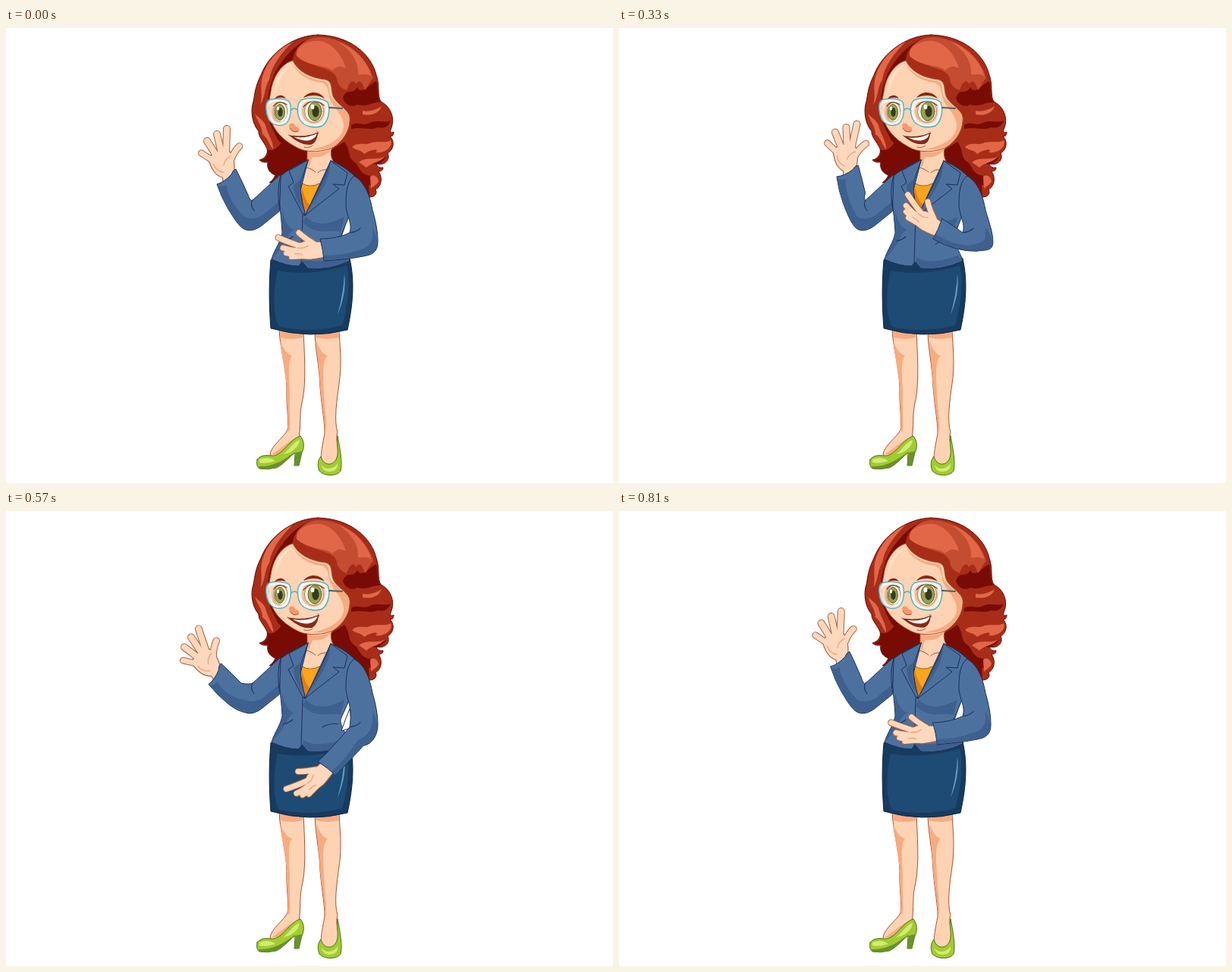
Recreate the animation shown at these times as an HTML page. Size 800x600 px, loop 1290 ms.

```html
<!DOCTYPE html>
<html lang="en">
<head>
<meta charset="utf-8">
<title>Waving woman</title>
<style>
html, body { margin: 0; width: 100%; height: 100%; overflow: hidden; background: #fff; }
svg { display: block; width: 100vw; height: 100vh; }
path, ellipse { stroke-linecap: round; stroke-linejoin: round; }
.hair { fill: #a82d18; stroke: #5d0d05; stroke-width: 1; }
.dark { fill: #780c04; }
.glow { fill: #e16748; }
.warm { fill: #c44c30; }
.skin { fill: #fdd3b4; stroke: #a65432; stroke-width: 1; }
.tan { fill: #f6ab80; }
.coat { fill: #4d719f; stroke: #1a3056; stroke-width: 1; }
.fold { fill: #3e608f; }
.seam { fill: none; stroke: #1e3661; stroke-width: 1.1; }
.line { fill: none; stroke: #a65432; stroke-width: 1; }
.shoe { fill: #a2cb31; stroke: #4d701b; stroke-width: 1; }
.glass { fill: #fff; fill-opacity: .1; stroke: #f4faf8; stroke-width: 4; stroke-opacity: .85; }
.rim { fill: none; stroke: #4fb3bb; stroke-width: 1.4; }
.edge { fill: none; stroke: #a9603c; }
.flesh { fill: none; stroke: #fdd8bd; }
</style>
</head>
<body>
<svg viewBox="0 0 800 600" preserveAspectRatio="none">
  <!-- hair -->
  <path class="hair" d="M411 9C378 10 347 33 336 62C328 78 328 87 326 97C322 108 324 126 333 136C332 143 340 150 344 159C346 167 340 173 334 174C338 178 342 177 345 177C343 186 349 192 355 194C353 199 350 202 347 204C360 202 370 194 382 190L450 200L479 223C486 223 490 218 487 213C496 208 496 196 491 189C495 189 497 187 497 184C491 185 489 182 488 179C500 182 507 173 503 165C512 160 512 148 506 143C510 143 511 141 511 137C508 139 506 138 507 134C514 118 506 103 494 97C489 90 493 75 488 62C482 36 455 10 411 9Z"/>
  <path class="dark" d="M344 160C352 164 358 158 364 150L400 162L430 160L446 150C454 160 450 170 458 176C466 180 464 190 476 194C490 196 484 208 478 207L479 222L450 195L385 190C370 194 360 202 348 203C354 199 354 196 356 194C348 192 343 186 346 177L335 175C344 172 346 167 344 160Z"/>
  <path class="dark" d="M444 92C450 77 456 90 463 78C469 89 477 75 488 70C491 80 488 91 494 98C483 97 476 105 463 101C454 106 446 100 444 92ZM455 128C464 122 470 130 480 125C489 120 498 126 507 122C504 130 498 133 490 131C480 136 469 130 455 133ZM470 181C480 173 488 177 501 170C495 180 487 181 481 178Z"/>
  <path class="warm" d="M411 12C446 12 475 36 484 66C479 70 477 78 473 82C470 73 467 66 461 74C458 66 452 72 449 82C442 80 436 74 436 66C430 50 404 55 384 36C380 24 394 14 411 12Z"/>
  <path class="glow" d="M383 37C381 24 397 16 414 17C431 20 443 36 448 53C439 48 434 52 430 56C420 47 399 52 383 37ZM438 18C463 28 477 47 482 64C474 58 469 63 464 61C465 43 455 30 438 18Z"/>
  <path class="glow" d="M456 157C464 149 473 156 482 151C492 149 501 152 507 148C511 158 497 166 487 164C494 158 480 160 472 166C467 160 462 162 456 157ZM465 177C476 169 485 175 499 170C492 178 482 177 475 184ZM470 109C478 111 488 108 495 103C492 113 481 116 470 114ZM480 196C486 192 490 197 491 202C488 208 484 208 481 212Z"/>
  <path class="glow" d="M378 18C358 28 344 44 338 64C334 80 339 88 335 101C342 92 340 79 347 68C350 50 362 34 378 18ZM328 113C331 123 338 130 338 140C346 146 346 153 352 160C353 150 344 139 342 128C338 120 332 118 328 113Z"/>
  <path class="dark" d="M402 13C381 21 365 39 354 60C347 77 344 92 345 106C343 120 352 134 358 147C366 157 372 158 380 158L350 126C344 107 347 71 378 43C378 30 389 19 402 13Z"/>

  <!-- legs and shoes -->
  <path class="skin" d="M360 397C361 422 369 445 370 474C369 496 373 515 371 530C366 540 350 550 348 562C352 573 369 560 386 541C389 525 386 509 391 490C396 465 393 425 392 399Z"/>
  <path class="tan" d="M361 400H391V408Q375 412 362 408ZM361 412C366 425 372 431 377 432C371 438 373 460 374 482C373 504 376 526 373 533L371 529C373 512 369 493 370 472ZM350 562C362 556 374 542 385 540L366 563Z"/>
  <path class="skin" d="M407 399C407 422 413 445 414 474C416 500 420 518 420 535C417 550 415 560 415 571C419 581 432 580 437 567C441 555 433 545 437 533C432 518 436 490 439 469C443 442 440 422 439 399Z"/>
  <path class="tan" d="M408 400H439V408Q424 412 408 408ZM409 412C414 426 419 431 424 432C416 439 418 460 419 482C420 504 424 526 421 534L420 529C420 512 415 493 414 472Z"/>
  <path class="shoe" d="M331 569Q336 562 349 564C364 566 372 543 388 538C394 546 393 554 390 560L386 577L380 577L381 560C371 568 364 577 356 580Q344 583 334 581Q329 577 331 569Z"/>
  <path fill="#d3eb72" d="M334 569Q346 564 355 571Q343 575 334 573ZM365 562C374 556 377 547 387 543C386 554 375 561 365 562Z"/>
  <path fill="#69922a" d="M382 560L390 558L386 577L380 576ZM333 578C352 579 368 569 382 558C371 568 364 577 356 580Q344 583 334 581Z"/>
  <path class="shoe" d="M437 538C440 554 444 574 441 584C437 591 420 592 413 584C410 577 411 569 415 565C418 577 431 579 436 567C439 558 435 549 437 538Z"/>
  <path fill="#d3eb72" d="M415 575C421 585 433 581 437 574Q438 584 427 585Q417 585 415 575Z"/>

  <!-- neck and face -->
  <path class="skin" d="M397 154V174L386 200L393 225L405 236L436 182C427 174 426 160 432 152Z"/>
  <path class="tan" d="M398 162C412 166 424 163 431 157C423 170 411 171 405 170C399 174 403 181 398 184Z"/>
  <path class="line" d="M396 184Q404 186 408 190M424 187Q415 186 411 191"/>
  <path class="skin" d="M378 43C365 46 352 62 349 84C346 100 344 108 350 124C356 140 370 151 386 159C400 165 418 163 430 158C444 150 454 134 453 118C452 108 438 102 432 92C427 82 432 71 421 68C402 66 385 58 378 43Z"/>
  <path class="tan" d="M378 45C384 62 408 69 420 70C430 75 422 84 431 94C439 104 452 109 452 119C453 134 444 150 430 157C420 161 410 161 402 160C423 157 443 147 445 131C446 116 434 108 428 96C423 83 426 75 415 72C399 70 382 61 378 45Z"/>
  <path fill="#fbe0c8" d="M356 70C361 57 370 51 375 50C363 60 359 71 355 86Z"/>
  <path fill="#f29b6d" d="M373 128C376 123 380 126 382 130C387 130 388 136 384 137C379 139 374 135 373 128Z"/>
  <path class="line" d="M374 132Q378 139 385 136"/>
  <path fill="#8f2412" d="M353 95C357 87 365 87 369 93C363 91 358 91 353 95ZM392 92C399 82 414 83 420 93C411 88 402 88 392 92Z"/>
  <g id="eyes">
    <ellipse cx="361" cy="111" rx="11" ry="15" fill="#e9b48d"/>
    <ellipse cx="362" cy="111" rx="9" ry="13" fill="#fff4ea" stroke="#a87553"/>
    <ellipse cx="361" cy="111" rx="6.5" ry="10.5" fill="#8f9636" stroke="#4c511b"/>
    <ellipse cx="361.5" cy="111" rx="3.2" ry="6" fill="#1f230a"/>
    <ellipse cx="405" cy="110" rx="15" ry="16" fill="#e9b48d"/>
    <ellipse cx="406" cy="110" rx="12.5" ry="14.5" fill="#fff4ea" stroke="#a87553"/>
    <ellipse cx="407" cy="110" rx="9" ry="12.5" fill="#8f9636" stroke="#4c511b"/>
    <ellipse cx="408" cy="110" rx="4.6" ry="7.5" fill="#1f230a"/>
    <ellipse cx="358.5" cy="106" rx="1.6" ry="2.5" fill="#fff"/>
    <ellipse cx="404" cy="104" rx="2.4" ry="3.2" fill="#fff"/>
    <path d="M353 103Q359 94 370 101M392 104Q404 90 419 102" fill="none" stroke="#64351f" stroke-width="1.4"/>
  </g>
  <g id="lids">
    <ellipse cx="362" cy="111" rx="11" ry="15" fill="#edb58d"/>
    <ellipse cx="406" cy="110" rx="16" ry="16" fill="#edb58d"/>
  </g>
  <path class="glass" d="M348 97C357 94 369 95 372 99C375 107 373 120 367 124C360 129 351 126 348 119C344 111 343 101 348 97ZM391 97C401 93 416 94 422 99C425 108 422 122 415 127C407 131 395 128 390 121C385 113 386 102 391 97Z"/>
  <path class="rim" d="M346 95C356 92 371 93 374 98C377 107 375 121 369 126C361 131 350 128 346 120C342 111 341 99 346 95ZM389 95C400 91 418 92 424 98C428 108 425 123 417 129C407 133 393 130 388 122C383 113 383 100 389 95ZM375 109Q380 103 385 109"/>
  <path d="M426 105L443 106" stroke="#40656c" stroke-width="2"/>
  <path id="mouth" fill="#8c2918" stroke="#6e2416"/>
  <path id="teeth" fill="#fff"/>
  <path id="lip" class="line"/>

  <!-- skirt, blouse and jacket -->
  <path d="M349 306C346 340 347 370 349 396Q400 411 450 398C457 366 460 335 453 304Z" fill="#173b60" stroke="#0e2440"/>
  <path d="M358 320C385 325 420 323 449 313C455 340 449 372 443 392Q400 403 360 394C350 375 353 342 358 320Z" fill="#1d4b74"/>
  <path d="M446 324Q449 350 437 378Q445 350 446 324" fill="#6f9cc4"/>
  <path d="M389 204Q400 212 413 205L417 209L394 247L386 225Z" fill="#f8a51d" stroke="#a15b10"/>
  <path d="M390 210Q394 228 401 234L394 246L388 227Z" fill="#df7e12"/>
  <path class="coat" d="M398 174C386 180 372 186 361 196C357 218 363 245 364 270C361 285 354 291 350 305Q369 314 386 314L390 308L398 317Q426 320 453 307C449 293 440 284 441 275C446 262 453 252 454 238L460 196C449 185 438 179 428 175L394 248L388 215Z"/>
  <path class="fold" d="M364 240C367 256 372 263 380 266C370 270 370 284 357 297L351 304C355 291 362 283 364 270ZM395 249C407 261 425 260 446 249L441 269C430 266 417 270 408 267C400 265 394 260 391 256ZM392 302Q410 314 446 300L452 306Q425 319 399 316L391 308Z"/>
  <path class="seam" d="M391 247L389 308M366 281Q374 279 378 275M438 281Q427 279 417 285"/>
  <path class="coat" d="M398 174L373 188L379 204L372 209L392 247L394 243C388 225 387 211 389 201Z"/>
  <path class="coat" d="M428 175L450 191L446 207L431 206L439 212L394 247C404 227 420 200 428 175Z"/>
  <path class="fold" d="M427 181C427 202 410 224 397 242C408 225 419 201 427 181ZM389 199C384 212 388 232 392 241Q379 222 379 207Z"/>

  <!-- waving arm -->
  <g id="wave"></g>
  <path id="sleeveL" class="coat"/>
  <path id="shadeL" class="fold"/>
  <path id="seamL" class="seam"/>

  <!-- bent arm -->
  <g id="rest"></g>
  <path id="gap" fill="#fff" stroke="#1a3056"/>
  <path id="sleeveR" class="coat"/>
  <path id="shadeR" class="fold"/>
  <path id="seamR" class="seam"/>
</svg>
<script>
const $ = id => document.getElementById(id);
const put = (id, d) => $(id).setAttribute('d', d);

// Outlined fingers joined to a palm.
function hand(id, palm, fingers, lines) {
  const strokes = (cls, extra) => fingers.map(([d, w]) =>
    `<path class="${cls}" d="${d}" stroke-width="${w + extra}"/>`).join('');
  $(id).innerHTML = strokes('edge', 2) +
    `<path d="${palm}" fill="#fdd8bd" stroke="#a9603c" stroke-width="1.2"/>` +
    strokes('flesh', 0) +
    `<path d="${lines}" fill="none" stroke="#eba47b" stroke-width="1.3"/>`;
}

hand('wave',
  'M287 205L285 197C274 194 270 183 267 174C269 166 278 162 286 161C295 160 299 166 300 173C301 181 302 187 299 196L298 205Z',
  [['M257.5 165L273 175', 7], ['M265 149L277 168', 8], ['M278 140L284 165', 8],
   ['M291 133L290 166', 8], ['M307.5 156Q301 162 296 175', 7.5]],
  'M296 169Q288 173 287 181M273 179Q277 189 286 190');
hand('rest',
  'M5 -9L-8 -9C-17 -13 -25 -10 -33 -6C-38 0 -37 8 -30 12C-20 17 -9 13 5 11Z',
  [['M-58 -14.5Q-46 -9 -28 -3', 7], ['M-52 -1Q-43 2 -27 3', 7], ['M-48 6Q-37 9 -25 7', 6],
   ['M-41 11L-22 10', 6], ['M-31 -21Q-25 -15 -12 -7', 7]],
  'M-33 -1Q-24 0 -19 -4M-36 7Q-30 6 -26 8');

const tracks = {
  wave: [[0, 0], [120, 10], [240, 19], [285, 20.5], [420, -21.8], [480, -27], [570, -20.3], [690, -9.5], [810, .9]],
  turn: [[0, 0], [120, 19], [240, 37], [285, 41], [420, .5], [540, -33], [570, -42.5], [690, -23.5], [810, -1.5]],
  x: [[0, 417], [240, 418], [420, 424], [570, 422], [690, 419], [810, 417]],
  y: [[0, 291], [120, 278], [240, 261], [285, 257], [420, 294], [540, 331], [570, 338], [690, 318], [810, 292]],
  smile: [[0, .75], [120, .1], [240, .1], [420, 1], [570, .95], [690, .72], [810, .7]],
  blink: [[0, 0], [150, 0], [225, .82], [255, .82], [330, 0], [810, 0]]
};

// Smooth curve through the keys, flat at turning points.
function sample(keys, t) {
  const last = keys.length - 2;
  let i = 0;
  while (i < last && t > keys[i + 1][0]) i++;
  const rate = k => (keys[k + 1][1] - keys[k][1]) / (keys[k + 1][0] - keys[k][0]);
  const slope = k => {
    if (k === 0) return rate(0);
    if (k > last) return rate(last);
    const a = rate(k - 1), b = rate(k);
    return a * b <= 0 ? 0 : 2 * a * b / (a + b);
  };
  const [t0, v0] = keys[i], [t1, v1] = keys[i + 1];
  const h = t1 - t0, u = (t - t0) / h, w = 1 - u;
  return v0 * w * w * (1 + 2 * u) + v1 * u * u * (3 - 2 * u) +
    h * u * w * (slope(i) * w - slope(i + 1) * u);
}

function turn(x, y, deg, cx, cy) {
  const a = deg * Math.PI / 180, c = Math.cos(a), s = Math.sin(a);
  return [cx + x * c - y * s, cy + x * s + y * c].map(n => n.toFixed(2)).join(' ');
}

function drawWave(a) {
  const p = (x, y) => turn(x - 335, y - 248, a, 335, 248);
  $('wave').setAttribute('transform', `rotate(${a} 335 248)`);
  put('sleeveL', `M362 193C349 204 337 217 325 227Q322 229 ${p(319, 220)}Q${p(312, 204)} ${p(303, 186)}
    Q${p(299, 187)} ${p(297, 193)}Q${p(288, 203)} ${p(278, 206)}Q${p(284, 224)} ${p(293, 239)}
    C${p(300, 250)} 308 264 316 266C324 269 333 264 339 259L360 242Z`);
  put('shadeL', `M${p(279, 208)}Q${p(284, 210)} ${p(290, 207)}Q${p(294, 229)} 314 249
    Q325 254 338 247L360 229V241L339 258C331 265 322 268 316 265Q308 262 ${p(293, 239)}Q${p(284, 224)} ${p(279, 208)}Z`);
  put('seamL', `M325 227Q321 233 327 241M362 194Q356 216 361 240`);
}

function drawRest(a, x, y) {
  const p = (dx, dy) => turn(dx, dy, a, x, y);
  const out = 490 + Math.max(0, a) * .085;
  const low = 301 - a * .2;
  const bend = 270 + Math.max(0, -a) * .35;
  $('rest').setAttribute('transform', `translate(${x} ${y}) rotate(${a})`);
  put('gap', `M453 ${bend - 24}Q447 ${bend - 10} 442 ${bend + 5}L456 ${bend + 1}Z`);
  put('sleeveR', `M459 195C474 204 480 223 483 240C488 257 ${out} 270 ${out} 282
    C${out} 295 483 ${low - 2} 471 ${low}Q${p(35, 14)} ${p(2, 16)}Q${p(1, 2)} ${p(-3, -13)}
    Q${p(20, -13)} 453 ${bend}C457 258 449 248 448 235C448 217 449 202 459 195Z`);
  put('shadeR', `M${p(2, 9)}Q${p(30, 9)} 464 ${low - 8}C479 ${low - 12} 485 283 483 263
    Q${out} 278 ${out - 1} 284C${out - 1} 295 482 ${low - 2} 471 ${low - 1}Q${p(35, 13)} ${p(2, 15)}Z`);
  put('seamR', `M453 ${bend}Q462 ${bend - 1} 467 ${bend - 6}`);
}

function drawFace(m, lid) {
  const l = 381 - 9 * m, r = 407 + 5 * m, ly = 145 - 4 * m, ry = 140.5 - 3 * m;
  const top = `M${l} ${ly}Q395 ${146 - m} ${r} ${ry}`;
  put('mouth', `${top}Q${407 + 2 * m} ${153 + 3 * m} 398 ${151 + 3 * m}Q388 ${152 + 2 * m} ${l} ${ly}Z`);
  put('teeth', `M${l + 5} ${ly + 1.5}Q395 ${147 - m} ${r - 1} ${ry + 1}Q${407 + m} 147 398 148.5Q389 149 ${l + 5} ${ly + 1.5}Z`);
  put('lip', `M${l - 2} ${ly - 1}L${l} ${ly}M${r - 1} ${ry - 2}Q${r + 2} ${ry - 1} ${r + 1} ${ry + 1}M393 157Q399 159 404 155`);
  $('lids').setAttribute('opacity', lid);
}

function draw(now) {
  const t = Math.min(810, Math.floor((now % 1290) / 30) * 30);
  const v = name => sample(tracks[name], t);
  drawWave(v('wave'));
  drawRest(v('turn'), v('x'), v('y'));
  drawFace(v('smile'), v('blink'));
}

const start = performance.now();
function tick() {
  draw(performance.now() - start);
  requestAnimationFrame(tick);
}
tick();
</script>
</body>
</html>
```
